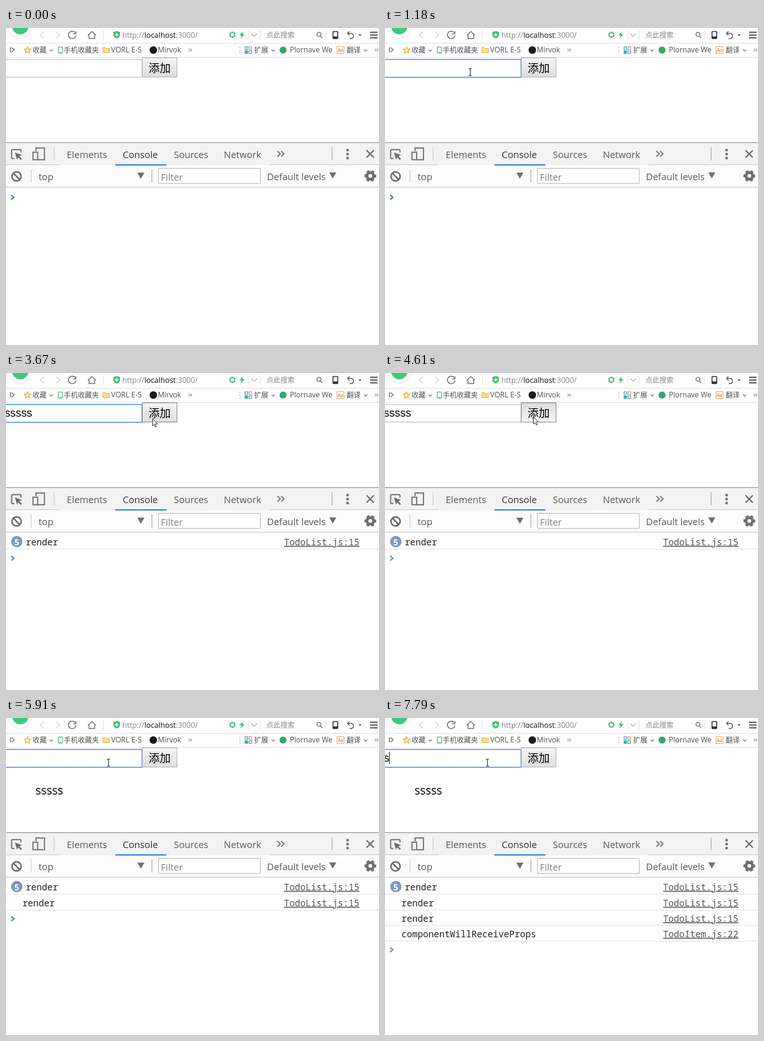
These frames come from a looping animation (795 by 675 pixels, 8 s). An HTML page:

```html
<!DOCTYPE html>
<html lang="zh">
<head>
<meta charset="utf-8">
<style>
html, body { margin: 0; width: 100%; height: 100%; overflow: hidden; background: #fff; }
svg { display: block; }
text { font-family: "Open Sans", "Noto Sans CJK SC", "Noto Sans CJK", sans-serif; white-space: pre; }
.line { fill: none; stroke: #555; stroke-width: 1.5; }
.faint { stroke: #ccc; }
.rule { stroke: #d8d8d8; stroke-width: 1; }
.bar { font-size: 15.6px; fill: #505050; }
.zh { font-size: 15px; }
.tool { font-size: 20px; fill: #5a5a5a; }
.gray { fill: #6e6e6e; }
.icon { fill: none; stroke: #6e6e6e; stroke-width: 2.4; }
.log { font: 19.15px "Noto Sans Mono", monospace; fill: #222; }
.link { fill: #545454; text-decoration: underline 1.6px; text-underline-offset: 2.5px; }
.badge { font-size: 18px; font-weight: 700; fill: #fff; text-anchor: middle; }
.typed { font: 23.33px "Liberation Sans", sans-serif; }
</style>
</head>
<body>
<svg width="795" height="675" viewBox="0 0 795 675">
  <defs>
    <linearGradient id="face" x2="0" y2="1"><stop stop-color="#f5f5f5"/><stop offset="1" stop-color="#dddddd"/></linearGradient>
    <linearGradient id="pressed" x2="0" y2="1"><stop stop-color="#dddddd"/><stop offset="1" stop-color="#f5f5f5"/></linearGradient>
  </defs>

  <!-- address bar -->
  <circle cx="30" cy="-4" r="26" fill="#fff" stroke="#ddd"/>
  <circle cx="30.5" cy="-4" r="17.5" fill="#3cc882"/>
  <path class="line faint" d="M81 8l-8 7 8 7M107 8l8 7-8 7"/>
  <path class="line" d="M147.500 10A8 8 0 1 0 149 16M149 7v5.500h-5.500M174.500 15.500L183 7.500l8.500 8M177 14v8.500h12V14"/>
  <path class="rule" d="M207.500 5v20M517.500 5v20M541.500 5v20M681.500 5v20M0 32.500h795M0 62.500h795"/>
  <path fill="#3fbf72" d="M236 6.500l7 2v6q0 5-7 8-7-3-7-8v-6z"/>
  <path stroke="#fff" stroke-width="2" d="M236 10.500v8M232 14.500h8"/>
  <text class="bar" style="font-size:16px;fill:#888" x="248" y="21">http://<tspan fill="#111">localhost</tspan>:3000/</text>
  <circle cx="482.500" cy="14.500" r="5" fill="none" stroke="#45bf86" stroke-width="3.500" pathLength="24" stroke-dasharray="3.400 .6"/>
  <path fill="#35c46f" d="M505 7l-7.500 8.500h4.500l-2 7 8.500-9.500h-5z"/>
  <path class="line" style="stroke:#aaa" d="M522.500 11.500l6.500 6.500 6.500-6.500"/>
  <text class="bar zh" style="fill:#888" x="555" y="20">点此搜索</text>
  <path class="line" d="M670 17l4 4"/><circle class="line" cx="667" cy="13.500" r="4.300"/>
  <rect class="line" style="stroke:#333;stroke-width:2" x="697" y="7.500" width="10" height="15" rx="1"/>
  <path fill="#333" d="M697 18h10v4h-10zM751.500 13.500h6l-3 3.500z"/>
  <path class="line" style="stroke-width:1.800" d="M732 7l-4 4.500 4 4.500M728.500 11.500h6q6 0 6 5.500t-6 5.500h-2"/>
  <path class="line" style="stroke:#333;stroke-width:2" d="M776 9h16M776 15h16M776 21h16"/>

  <!-- bookmarks -->
  <path class="line" d="M9.500 41v11M12 41.500l5.500 5-5.500 5"/>
  <path fill="#ffe9ae" stroke="#e6a52e" stroke-width="1.300" d="M46 40l2.200 4.500 5 .6-3.700 3.400 1 5-4.500-2.500-4.500 2.500 1-5-3.700-3.400 5-.6z"/>
  <text class="bar zh" x="56.500" y="52">收藏</text>
  <rect x="111.500" y="40.500" width="9" height="13" rx="1" fill="#fff" stroke="#3dae72" stroke-width="1.400"/>
  <path stroke="#3dae72" d="M114 51.500h4"/>
  <text class="bar zh" x="123" y="52">手机收藏夹</text>
  <path fill="#ffdc82" stroke="#d9a83c" d="M206.500 41.500h5l2 2h7v9h-14z"/>
  <text class="bar" x="224" y="52">VORL E-S</text>
  <circle cx="314" cy="47" r="8" fill="#1b1b1b"/>
  <text class="bar" x="323.500" y="52">Mirvok</text>
  <path class="line" style="stroke:#888;stroke-width:1.200" d="M389 44l3 3-3 3M393 44l3 3-3 3M786 44l3 3-3 3M790 44l3 3-3 3"/>
  <path class="line" style="stroke-width:1.200" d="M93 46l3.500 3.500 3.500-3.500M566 46l3.500 3.500 3.500-3.500M763 46l3.500 3.500 3.500-3.500"/>
  <path stroke="#aaa" stroke-width="2" stroke-dasharray="2 3.500" d="M498.500 40.500v13"/>
  <g fill="none" stroke-width="1.600">
    <path stroke="#3f9fd8" d="M509.500 40h5.500v5.500h-5.500z"/>
    <path stroke="#ee9550" d="M518 40h5.500v5.500H518z"/>
    <path stroke="#3cb38a" fill="#3cb38a" d="M509.500 48.500h5.500V54h-5.500z"/>
    <path stroke="#3f9fd8" d="M518 48.500h5.500V54H518z"/>
  </g>
  <text class="bar zh" x="529" y="52">扩展</text>
  <circle cx="590.500" cy="47" r="7.500" fill="#38a56c"/>
  <text class="bar" x="605" y="52">Plornave We</text>
  <rect x="705.500" y="39.500" width="15" height="15" fill="#fff8ef" stroke="#d49a62"/>
  <text x="707" y="51" font-size="10" fill="#c57a35">Aa</text>
  <text class="bar zh" x="726" y="52">翻译</text>

  <!-- developer tools -->
  <path fill="#f3f3f3" d="M0 244h795v48H0z"/>
  <path fill="#fcfcfc" d="M0 292h795v47H0z"/>
  <path stroke="#a8a8a8" stroke-width="2" d="M0 244h795"/>
  <path stroke="#ccc" stroke-width="1.600" d="M0 291.300h114M562 291.300h233M0 339h795M102.500 254v28M53.500 301v28"/>
  <path stroke="#aaa" stroke-width="1.600" d="M695 254v28M311 301v28"/>
  <path fill="#4285f4" d="M233 290h109v3H233z"/>
  <path class="icon" d="M18 278h-4q-2 0-2-2v-15q0-2 2-2h16q2 0 2 2v4"/>
  <path class="gray" d="M19 265l15 5.500-5.500 2.500 5.500 5.500-2.500 2.500-5.500-5.500-2.500 5z"/>
  <path class="icon" d="M64 262v-6.500h18v25H68"/>
  <rect class="icon" x="57.500" y="264.500" width="10" height="16"/>
  <g class="tool">
    <text x="129.500" y="277">Elements</text>
    <text x="248.800" y="277" fill="#333">Console</text>
    <text x="357.700" y="277">Sources</text>
    <text x="464.300" y="277">Network</text>
    <text x="69.500" y="324">top</text>
    <text x="556.300" y="324">Default levels</text>
  </g>
  <path class="icon" d="M578.500 262l6 6-6 6M586.500 262l6 6-6 6"/>
  <g class="gray"><circle cx="728" cy="260" r="2.800"/><circle cx="728" cy="268.500" r="2.800"/><circle cx="728" cy="277" r="2.800"/></g>
  <path class="icon" style="stroke-width:3" d="M768.500 260.500l15.500 15.500M784 260.500l-15.500 15.500"/>
  <circle class="icon" style="stroke-width:3.200" cx="22.500" cy="316" r="9.700"/>
  <path class="icon" style="stroke-width:3.200" d="M15.500 309l14 14"/>
  <path class="gray" d="M280 308h15l-7.500 13zM689 307.500h15l-7.500 13z"/>
  <rect x="325" y="299" width="217" height="32" rx="2" fill="#fff" stroke="#ccc" stroke-width="2"/>
  <text class="tool" style="fill:#808080" x="330" y="325">Filter</text>
  <circle class="icon" style="stroke-width:6" cx="776.500" cy="315" r="7"/>
  <circle class="icon" style="stroke-width:3.500" cx="776.500" cy="315" r="10.800" pathLength="12" stroke-dasharray="1.100 .9" stroke-dashoffset=".5"/>

  <g id="live"></g>
</svg>
<script>
const LOOP = 8000, RELEASE = 4690, RETYPE = 6690;
const keyTimes = [1500, 1720, 1870, 2420, 2820];
const caretOff = [[3350, 3830], [4360, RELEASE], [7240, 7790]];
const focusSpans = [[1180, 4610], [5910, LOOP]];
// start time, number of steps, from x, y, to x, y
const moves = [
  [410, 9, 739, 602, 181, 94],
  [1960, 1, 181, 94, 181, 95],
  [2970, 1, 181, 95, 181, 98],
  [3350, 4, 181, 98, 312, 97],
  [3750, 1, 312, 97, 316, 93],
  [4740, 5, 316, 93, 218, 95],
];
const STEP = 75;
const live = document.getElementById('live');
const within = (t, spans) => spans.some(([a, b]) => t >= a && t < b);

function pointer(t) {
  const move = moves.filter(m => m[0] <= t).pop();
  if (!move) return null;
  const [start, steps, x0, y0, x1, y1] = move;
  const u = Math.min(1, (Math.floor((t - start) / STEP) + (steps === 1)) / steps);
  const ease = 1 - (1 - u) ** 2;
  return { x: Math.round(x0 + (x1 - x0) * ease), y: Math.round(y0 + (y1 - y0) * ease) };
}

function drawPointer({ x, y }) {
  const overInput = x < 290 && y > 66 && y < 106;
  return overInput
    ? `<path transform="translate(${x + 0.5} ${y})" fill="none" stroke="#000" stroke-width="1.2"
        d="M-3.500-7.500h2.500l1 1 1-1h2.500M0-6.500v13M-3.500 7.500h2.500l1-1 1 1h2.500"/>`
    : `<path transform="translate(${x} ${y})" fill="#fff" stroke="#000"
        d="M.5 .5v15l3.500-3 2.500 5.500 2.300-1-2.500-5.500h4.700z"/>`;
}

function drawForm(t, mouse) {
  const typed = t < RELEASE ? keyTimes.filter(k => k <= t).length : +(t >= RETYPE);
  const focused = within(t, focusSpans);
  const hover = mouse && mouse.x >= 290 && mouse.x < 365 && mouse.y > 63 && mouse.y < 105;
  const down = t >= 4610 && t < RELEASE;
  const caretX = -2.6 + typed * 11.67;
  return `<rect x="-8" y="67.500" width="298" height="37" fill="#fff" stroke="#a5a5a5"/>
    <text class="typed" x="-2.6" y="93">${'s'.repeat(typed)}</text>
    ${focused && !within(t, caretOff) ? `<path d="M${Math.floor(caretX)} 72h1.200v26h-1.200z"/>` : ''}
    ${focused ? '<rect x="-8" y="67" width="298" height="38" rx="1" fill="none" stroke="#5293ea" stroke-width="2"/>' : ''}
    <rect x="290.500" y="63.500" width="74" height="41" fill="url(#${down ? 'pressed' : 'face'})" stroke="${hover ? '#666' : '#a0a0a0'}"/>
    <text x="304" y="93.500" font-size="23.5">添加</text>
    ${t >= RELEASE ? '<text x="63" y="163" font-size="24.6">sssss</text>' : ''}`;
}

function drawConsole(t) {
  const list = 'TodoList.js:15', count = keyTimes.filter(k => k <= t).length;
  const rows = [];
  if (count) rows.push(['render', list, count]);
  if (t >= RELEASE) rows.push(['render', list]);
  if (t >= RETYPE) rows.push(['render', list], ['componentWillReceiveProps', 'TodoItem.js:22']);
  const middle = i => 360 + Math.ceil(33.2 * i);
  const promptColor = ['#3a7de0', '#6b88b8', '#3590cb'][rows.length] || '#6b88b8';
  return rows.map(([label, file, n], i) => {
    const y = middle(i), badge = n > 1;
    return `${badge ? `<circle cx="23" cy="${y - 1}" r="12" fill="#7f98bf"/><text class="badge" x="23" y="${y + 6.5}">${n}</text>` : ''}
      <text class="log" x="${badge ? 42 : 35}" y="${y + 7}">${label}</text>
      <text class="log link" x="592.5" y="${y + 7}">${file}</text>
      <path stroke="#ececec" stroke-width="1.800" d="M0 ${y + 15}h795"/>`;
  }).join('') +
    `<path fill="none" stroke="${promptColor}" stroke-width="2.600" d="M11 ${middle(rows.length) - 4.5}l6 5-6 5"/>`;
}

let shown;
const started = performance.now();
function frame() {
  const t = (performance.now() - started) % LOOP;
  const mouse = pointer(t);
  const view = drawForm(t, mouse) + drawConsole(t) + (mouse ? drawPointer(mouse) : '');
  if (view !== shown) live.innerHTML = shown = view;
  requestAnimationFrame(frame);
}
frame();
</script>
</body>
</html>
```
